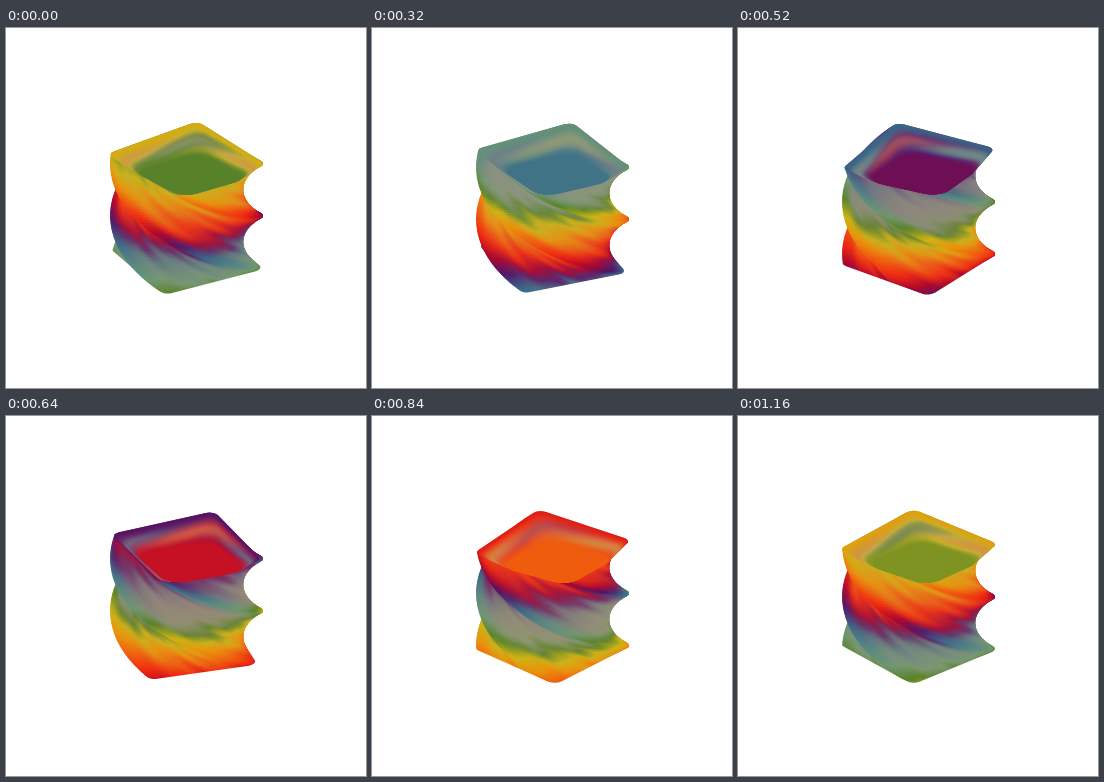
An HTML page with a canvas that plays this animation: 360x360 px, repeating every 1200 ms.

```html
<!DOCTYPE html>
<html lang="en">
<head>
<meta charset="utf-8">
<title>Twisted prism</title>
<style>
  html, body { margin: 0; width: 100%; height: 100%; overflow: hidden; background: #fff; }
  canvas { display: block; width: 360px; height: 360px; }
</style>
</head>
<body>
<canvas id="stage" width="360" height="360"></canvas>
<script>
const ctx = document.getElementById('stage').getContext('2d');
const TAU = Math.PI * 2;
const STEP = 40, STEPS = 30;
const CX = 180.5, TOP = 131, HEIGHT = 99.5;
const TILT = 0.474, TWIST = 3;
const HALF = 56.8, ROUND = 9;
const STOPS = 64, RINGS = 30;

const rgb = hex => [1, 3, 5].map(i => parseInt(hex.slice(i, i + 2), 16));
const mix = (a, b, k) => a.map((v, i) => v + (b[i] - v) * k);
const css = c => `rgb(${c.map(Math.round).join(',')})`;

// evenly spaced around one colour cycle
const CYCLE = ['#58822a', '#6e9670', '#558782', '#376989', '#4e1469',
  '#af052d', '#f0280f', '#f05c0e', '#eb910a', '#cdb414'].map(rgb);
const TAN = rgb('#b49a80');

function hue(u) {
  const x = (u - Math.floor(u)) * CYCLE.length;
  const i = Math.floor(x) % CYCLE.length;
  return mix(CYCLE[i], CYCLE[(i + 1) % CYCLE.length], x - Math.floor(x));
}

// one rounded square lying flat, coloured around its centre
function slice(x, y, turn, half, round, tilt, color) {
  ctx.setTransform(1, 0, 0, tilt, x, y);
  ctx.rotate(turn);
  const fill = ctx.createConicGradient(0, 0, 0);
  for (let i = 0; i <= STOPS; i++) {
    fill.addColorStop(i / STOPS, css(color(i / STOPS * TAU)));
  }
  ctx.fillStyle = fill;
  ctx.beginPath();
  ctx.roundRect(-half, -half, 2 * half, 2 * half, round);
  ctx.fill();
}

// ridges lag behind the faces in colour; faces look hazy, most of all in cool hues
function sideColor(a, turn, h, t) {
  const front = Math.sin(a + turn);
  const ridge = Math.pow((1 - Math.cos(4 * a)) / 2, 9);
  const streak = .025 * Math.sin(12 * a + 5 * h) + .018 * Math.sin(20 * a - 9 * h + 1);
  const u = t - .04 - .84 * Math.pow(h, 1.2) - .05 * front - .1 * ridge + streak;
  const cool = Math.max(0, Math.cos(TAU * (u - .22)));
  const haze = (.12 + .55 * cool) * (1 - .7 * h ** 3) * (1 - ridge);
  return mix(hue(u), mix(TAN, hue(t), .15), haze);
}

function rimColor(a, j, t) {
  const bulge = Math.sin(Math.PI * j) ** 2;
  const streak = Math.sin(2 * a + 1 + 5 * j);
  const u = t - .13 * (1 - j) + .1 * bulge * streak;
  return mix(hue(u), TAN, .45 * bulge);
}

function draw(t) {
  ctx.setTransform(1, 0, 0, 1, 0, 0);
  ctx.fillStyle = '#fff';
  ctx.fillRect(0, 0, 360, 360);

  const spin = t * TAU + 8 * Math.PI / 180 - Math.PI / 4;

  for (let i = 100; i >= 0; i--) {
    const h = i / 100;
    const turn = spin - TWIST * h;
    slice(CX, TOP + HEIGHT * h, turn, HALF, ROUND, TILT, a => sideColor(a, turn, h, t));
  }

  // hollow top: rings shrink, soften and sink towards the flat core
  for (let i = 0; i <= RINGS; i++) {
    const j = i / RINGS;
    slice(CX + 5 * j, TOP + 16 * j, spin, HALF * (1 - .27 * j), ROUND + 10 * j,
      TILT - .08 * j, a => rimColor(a, j, t));
  }
}

let last = -1;
function tick() {
  const n = Math.floor(performance.now() / STEP) % STEPS;
  if (n !== last) draw((last = n) / STEPS);
  requestAnimationFrame(tick);
}
tick();
</script>
</body>
</html>
```
